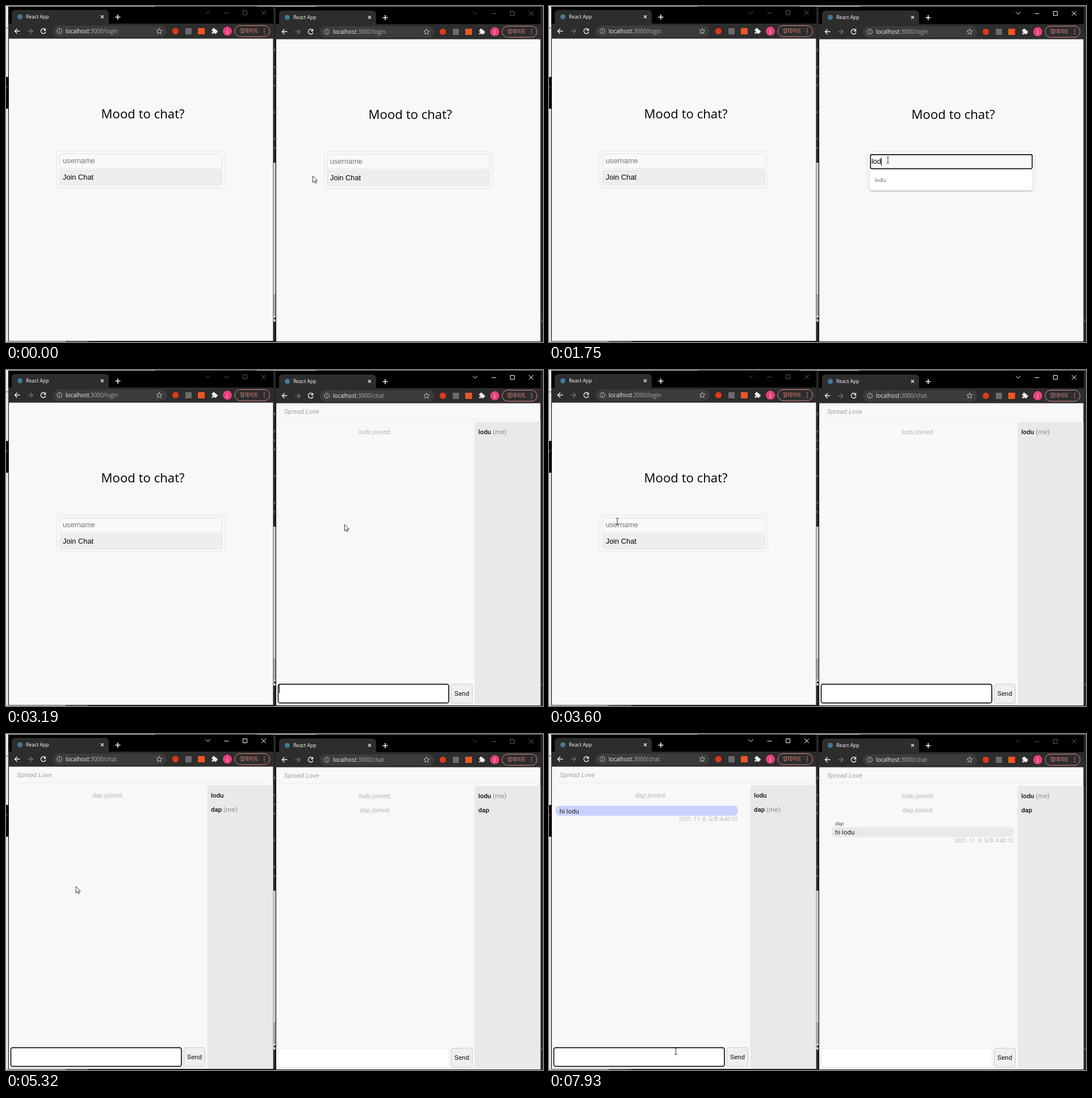
Write an HTML page with a canvas that moves like this. It is 946 by 592 pixels and loops after 8 s.

```html
<!DOCTYPE html>
<html lang="en">
<head>
<meta charset="utf-8">
<title>Chat demo</title>
<style>
  html, body { margin: 0; width: 100%; height: 100%; overflow: hidden; background: #222; }
  canvas { display: block; }
</style>
</head>
<body>
<canvas width="946" height="592"></canvas>
<script>
const ctx = document.querySelector('canvas').getContext('2d');
const LOOP = 8000, BLINK = 530;
const UI = '"Open Sans", "Noto Sans CJK KR", "Noto Sans CJK", sans-serif';
const ARIAL = '"Liberation Sans", sans-serif';
const ROBOTO = 'Roboto, "Noto Sans CJK KR", "Noto Sans CJK", sans-serif';
const HISTORY = ['lodu', 'dap', 'df', 'dd', 'aa', 'test'];
const STAMP = '2021. 11. 8. 오후 4:40:12';

// Each user: window offset, focus span, login keys, submit and join times.
const right = { dx: 471, dy: 1, focus: [755, 3785], list: 815, name: 'lodu',
  keys: [[1545, 1], [1685, 2], [1745, 3], [1885, 4]], submit: 2355, join: 2900 };
const left = { dx: 0, dy: 0, focus: [3785, Infinity], list: 3785, name: 'dap',
  keys: [[4195, 1], [4455, 2], [4525, 3]], submit: 4595, join: 4790 };
const message = 'hi lodu', SENT = 7400;
const messageKeys = [...message].map((_, i) => [6855 + i * 69, i + 1]);

const mousePath = [[70, 540, 299], [200, 509, 280], [330, 560, 250], [460, 597, 271.5],
  [3190, 597, 271.5], [3590, 120, 267], [3720, 123, 267], [5320, 122.5, 266],
  [5460, 149, 560], [5730, 149, 560], [5870, 225, 556], [6010, 223.5, 559]];

function box(x, y, w, h, radius, fill, stroke, width = 1) {
  ctx.beginPath();
  ctx.roundRect(x, y, w, h, radius);
  if (fill) { ctx.fillStyle = fill; ctx.fill(); }
  if (stroke) { ctx.strokeStyle = stroke; ctx.lineWidth = width; ctx.stroke(); }
}

function disc(x, y, r, color) {
  ctx.beginPath();
  ctx.arc(x, y, r, 0, 7);
  ctx.fillStyle = color;
  ctx.fill();
}

function path(d, color, width = 1, fill) {
  const p = new Path2D(d);
  if (fill) { ctx.fillStyle = fill; ctx.fill(p); }
  ctx.strokeStyle = color;
  ctx.lineWidth = width;
  ctx.stroke(p);
}

function text(string, x, y, font, color, align = 'left') {
  ctx.font = font;
  ctx.fillStyle = color;
  ctx.textAlign = align;
  ctx.fillText(string, x, y);
  return ctx.measureText(string).width;
}

// Latest [time, value] entry that has been reached.
const latest = (keys, t) => keys.filter(k => k[0] <= t).pop();

function caret(x, y, h, since, t) {
  if ((t - since) % (2 * BLINK) < BLINK) {
    ctx.fillStyle = '#000';
    ctx.fillRect(Math.round(x), y, 1, h);
  }
}

function desktop() {
  const strips = [
    [0, 0, 946, 592, '#272727'], [0, 0, 5, 125, '#e6e6e6'], [0, 38, 4, 1, '#555'],
    [0, 125, 5, 56, '#080808'], [0, 181, 5, 411, '#e2e2e2'], [0, 590, 105, 2, '#c4c4c4'],
    [105, 590, 40, 2, '#666'], [0, 0, 262, 1, '#d5d5d5'], [262, 0, 180, 1, '#777'],
    [442, 0, 105, 1, '#d5d5d5'], [547, 0, 399, 1, '#666'], [470, 276, 5, 232, '#c6c6c6'],
    [470, 508, 5, 37, '#a2a2a2'], [470, 545, 5, 11, '#c6c6c6'], [472, 549, 3, 3, '#222'],
    [943, 552, 2, 5, '#4b4b8a'], [472, 75, 2, 5, '#47719c']];
  for (const [x, y, w, h, color] of strips) {
    ctx.fillStyle = color;
    ctx.fillRect(x, y, w, h);
  }
  for (const y of [106, 122, 138, 185, 232, 248]) {
    ctx.fillStyle = '#666';
    ctx.fillRect(472, y, 2, 4);
  }
  text('r', 0, 146, '9px ' + UI, '#d0406a');
}

function chrome(focused, url) {
  box(4, 1, 467, 589.5, 0, '#000');
  box(10, 7, 171, 26, [6, 6, 0, 0], '#2d2d2d');
  box(4, 31, 467, 26.5, 0, '#2d2d2d');
  disc(24.5, 19, 4.5, '#41799a');
  text('React App', 35, 22.3, '8.7px ' + UI, '#fff');
  path('M167 16.5l5 5m0-5l-5 5', '#eee', 1.2);
  path('M192.5 19.5h9m-4.5-4.5v9', '#fff', 1.5);
  const control = focused ? '#fff' : '#5c5c5c';
  path('M351.5 9.5l4 4l4-4M384.5 12.5h8M417.5 8.5h7v7h-7zM450 8l8 8m0-8l-8 8', control, 1);

  path('M24.5 44.3h-9m4.3-4.4l-4.4 4.4l4.4 4.4', '#eee', 1.4);
  path('M38 44.3h9m-4.3-4.4l4.4 4.4l-4.4 4.4', '#777', 1.3);
  path('M69 41.2a4.4 4.4 0 1 0 1 4.3', '#eee', 1.4);
  path('M70 39.5v4h-4z', '#eee', .5, '#eee');
  box(82, 34.5, 201, 20, 10, '#3c3c3c');
  path('M98.6 44.3a4.4 4.4 0 1 1-8.8 0a4.4 4.4 0 1 1 8.8 0M94.2 43.7v3m0-5.3v1.2', '#ccc', 1);
  const host = text('localhost', 105, 47.9, '9.9px ' + UI, '#f0f0f0');
  text(':3000/' + url, 105 + host, 47.9, '9.9px ' + UI, '#a9abae');
  path('M270 39.3l1.4 3.3l3.5.3l-2.7 2.3l.9 3.5l-3.1-1.9l-3.1 1.9l.9-3.5l-2.7-2.3l3.5-.3z', '#ccc', .9);
  disc(298.5, 44.3, 5.6, '#dc3a1b');
  box(316, 39, 11, 11, 1, '#6a6a6a');
  box(338, 39, 12, 11, 1, '#ee5622');
  box(362.5, 41, 8, 8, 1, '#eee');
  disc(366, 40.6, 1.9, '#eee');
  disc(371, 45, 1.9, '#eee');
  disc(363, 45.2, 1.4, '#2d2d2d');
  disc(366.3, 48.8, 1.4, '#2d2d2d');
  disc(390, 44.3, 8, '#e8407a');
  text('j', 390, 47.3, '9.5px ' + UI, '#fff', 'center');
  box(403, 34.5, 61.5, 19.5, 9.75, null, '#e58b84');
  text('업데이트', 412, 47.3, '8.8px ' + UI, '#f28b82');
  for (const y of [40.5, 44.3, 48.1]) disc(455, y, .9, '#f28b82');
  box(5, 57.5, 465.5, 532.5, 0, '#f8f8f8');
}

function spinner(elapsed) {
  const middle = -Math.PI / 2 + elapsed / 2000 * 2 * Math.PI;
  for (const [spread, color] of [[Math.PI, '#f3f3f3'], [Math.PI / 4, '#4ca3dc']]) {
    ctx.beginPath();
    ctx.arc(238.5, 236, 9, middle - spread, middle + spread);
    ctx.strokeStyle = color;
    ctx.lineWidth = 3.2;
    ctx.stroke();
  }
}

function suggestions(typed) {
  const items = HISTORY.filter(s => s.startsWith(typed) && s !== typed);
  if (!items.length) return;
  ctx.save();
  ctx.shadowColor = 'rgba(0,0,0,.3)';
  ctx.shadowBlur = 2.5;
  ctx.shadowOffsetY = 1.2;
  box(94, 287.5, 287, 36.5 + 25.7 * (items.length - 1), 2.5, '#fff');
  ctx.restore();
  items.forEach((s, i) => text(s, 103, 309.3 + 25.7 * i, '9.3px ' + UI, '#50505a'));
}

function login(user, focused, t) {
  const key = latest(user.keys, t);
  const typed = user.name.slice(0, key ? key[1] : 0);
  const loading = t >= user.submit;
  text('Mood to chat?', 241, 197.5, '22.2px ' + UI, '#000', 'center');
  if (loading) spinner(t - user.submit);
  box(89.5, 255.5, 296, 65, 4, null, '#e6e6e6');
  box(95, 289.5, 285.5, 25.5, 2.5, loading ? '#ecefee' : '#eee', '#dfdfdf');
  text('Join Chat', 100, 305.8, '12.8px ' + ARIAL, '#000');
  if (t >= user.list && focused && !loading) suggestions(typed);
  if (focused) box(95.3, 260.9, 284.9, 24.7, 2.5, '#f9f9f9', '#111', 1.6);
  else box(95, 260.5, 285.5, 25.5, 2.5, '#f9f9f9', '#e2e2e2');
  const width = text(typed, 97, 277, '12.8px ' + ARIAL, '#000');
  if (!typed) text('username', 100, 277, '12.8px ' + ARIAL, '#757575');
  if (focused) caret(97 + width, 266, 15, key ? key[0] : user.focus[0] - 5, t);
}

function bubble(x, y, color) {
  box(x, y, 321.5, 17.5, 7, color);
  text(message, x + 7, y + 13, '11.6px ' + ROBOTO, '#222');
  text(STAMP, x + 321, y + 26.5, '9.6px ' + ROBOTO, '#b4b4b4', 'right');
}

function chat(user, focused, t) {
  const isLeft = user === left;
  const joined = [right, left].filter(u => t >= u.join);
  text('Spread Love', 19, 75.8, 'italic 11.6px ' + ROBOTO, '#a2a2a2');
  box(12, 85.5, 453, 1, 0, '#eee');
  box(354.5, 90, 116, 499, [5, 0, 0, 0], '#e9e9e9');
  joined.forEach((u, i) => {
    const width = text(u.name, 361, 112 + 25.2 * i, '500 11.6px ' + ROBOTO, '#111');
    if (u === user) text('(me)', 364 + width, 112 + 25.2 * i, '11.6px ' + ROBOTO, '#8a8a8a');
  });
  joined.filter(u => u.join >= user.join).forEach((u, i) =>
    text(u.name + ' joined.', 179.5, 112 + 25.2 * i, 'italic 11.6px ' + ROBOTO, '#b4b4b4', 'center'));

  if (t >= SENT) {
    if (isLeft) bubble(11.5, 126.5, '#c9d2ff');
    else {
      text(left.name, 33, 159.5, 'italic 9.6px ' + ROBOTO, '#555');
      bubble(26, 163, '#e9e9e9');
    }
  }

  if (focused) box(8.5, 552.7, 300.5, 33, 3.5, '#fff', '#111', 1.7);
  else box(8.5, 552.5, 301, 33.5, 3.5, '#fff', '#e5e5e5');
  box(313.5, 552.5, 37, 33.5, 3, '#efefef', '#c9c9c9');
  text('Send', 332, 573, '11.6px ' + ROBOTO, '#111', 'center');
  if (focused) {
    const key = isLeft && latest(messageKeys, t);
    const sent = isLeft && t >= SENT;
    const typed = key && !sent ? message.slice(0, key[1]) : '';
    const width = text(typed, 10, 565, '11.6px ' + ROBOTO, '#111');
    caret(10 + width, 554, 14, sent ? SENT : key ? key[0] : user.join, t);
  }
}

function drawWindow(user, t) {
  const focused = t >= user.focus[0] && t < user.focus[1];
  const inChat = t >= user.join;
  ctx.save();
  ctx.translate(user.dx, user.dy);
  chrome(focused, inChat ? 'chat' : 'login');
  (inChat ? chat : login)(user, focused, t);
  ctx.restore();
}

function mouseAt(t) {
  const next = mousePath.findIndex(p => p[0] > t);
  if (next < 1) return mousePath.at(next).slice(1);
  const [t0, x0, y0] = mousePath[next - 1], [t1, x1, y1] = mousePath[next];
  const k = (t - t0) / (t1 - t0);
  return [x0 + (x1 - x0) * k, y0 + (y1 - y0) * k];
}

function overInput(x, y, user, t) {
  x -= user.dx;
  y -= user.dy;
  if (t >= user.join) return x > 8 && x < 310 && y > 552 && y < 586;
  return t < user.submit && x > 95 && x < 381 && y > 260 && y < 286;
}

function mouse(t) {
  const [x, y] = mouseAt(t);
  ctx.save();
  ctx.translate(x, y);
  if ([left, right].some(u => overInput(x, y, u, t))) {
    path('M-2.5-5.5h2l.5.5l.5-.5h2M0-5v10M-2.5 5.5h2l.5-.5l.5.5h2', '#333', 1);
  } else {
    path('M.5.5v11.5l2.7-2.5l1.8 4l1.8-.8l-1.8-3.8h3.6z', '#222', .9, '#fff');
  }
  ctx.restore();
}

function frame(now) {
  const t = now % LOOP;
  desktop();
  drawWindow(left, t);
  drawWindow(right, t);
  mouse(t);
  requestAnimationFrame(frame);
}
requestAnimationFrame(frame);
</script>
</body>
</html>
```
